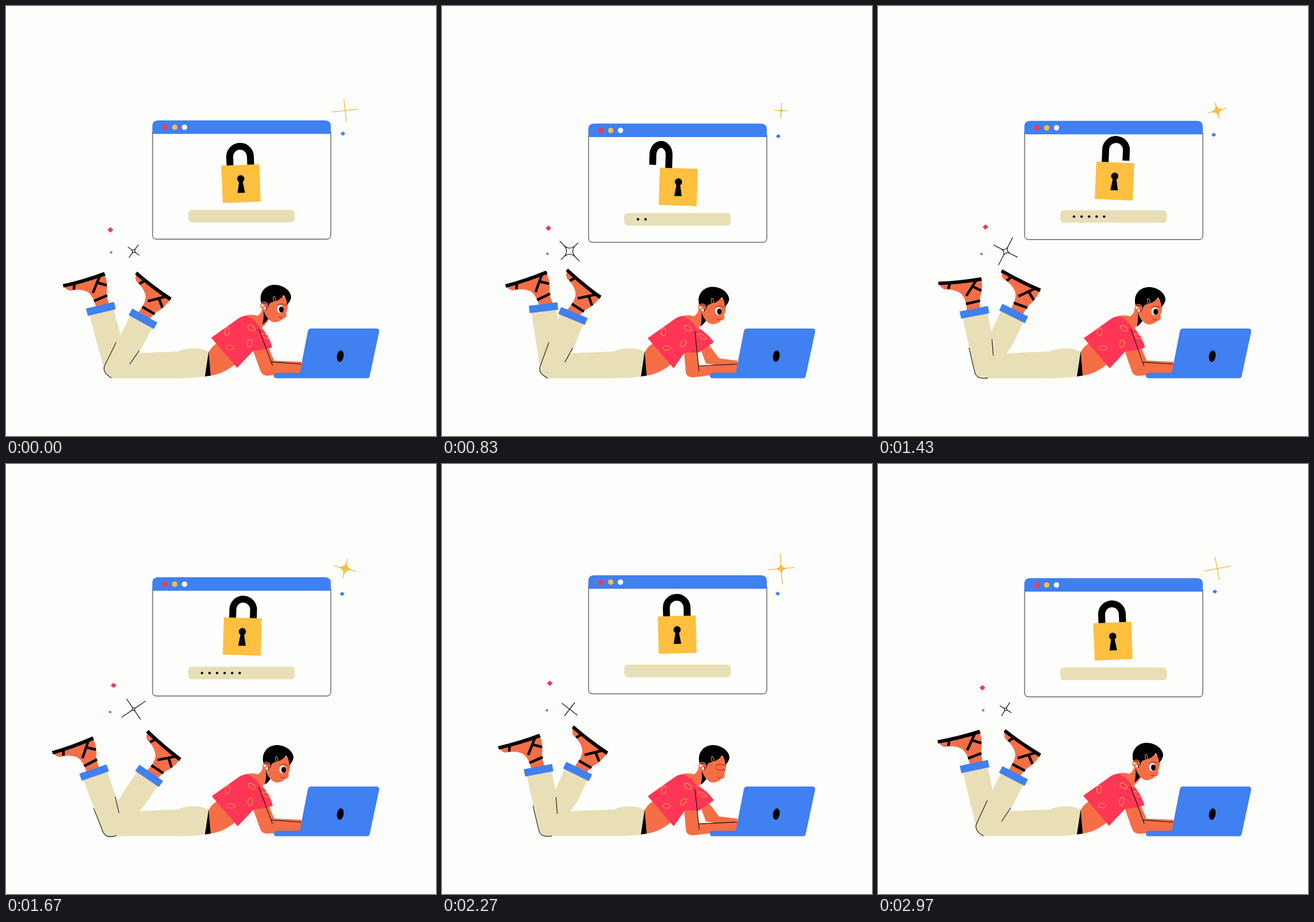
These frames come from a looping animation (748 by 748 pixels, 3.01 s). An HTML page:

```html
<!DOCTYPE html>
<html lang="en">
<head>
<meta charset="utf-8">
<title>Password lock</title>
<style>
  html, body { margin: 0; width: 100%; height: 100%; overflow: hidden; background: #fdfdfc; }
  svg { display: block; width: 100vw; height: 100vh; }
  .blue { fill: #4080f0; }
  .cream { fill: #e9dfb6; }
  .skin { fill: #f66e46; }
  .red { fill: #ff3656; }
  .yellow { fill: #ffbf3f; }
  .line { fill: none; stroke: #111; stroke-width: 1.1; stroke-linecap: round; stroke-linejoin: round; }
  .thin { fill: none; stroke: #8a1a24; stroke-width: 0.9; stroke-linecap: round; }
  .strap { fill: none; stroke: #000; stroke-width: 4.5; }
  .leaf { fill: none; stroke: #ffb04e; stroke-width: 1; }
</style>
</head>
<body>
<svg viewBox="0 0 748 748">
  <defs>
    <g id="foot">
      <path class="skin" d="M-50-46H23Q24-30 18-18Q14-8 16 8H-8Q-6-16-14-26Q-24-36-42-37Q-48-39-50-46Z"/>
      <path class="strap" d="M-8-8 17-11M14-47-6-22M5-38 21-28M-32-47-36-37"/>
      <path d="M-52-51.500Q-15-49 23-51.500L24-45Q-15-43-52-45.500Z"/>
    </g>
    <g id="shin">
      <path class="cream" d="M-22-102-19-2Q-18 11 1 11.500L8 5 18-25 22.500-58 22-102Z"/>
      <rect class="blue" x="-25" y="-111.500" width="50" height="13"/>
    </g>
  </defs>

  <g id="window">
    <path fill="#fefefd" stroke="#222" d="M255 20V199.500Q255 206.500 262 206.500H558Q565 206.500 565 199.500V20Z"/>
    <path class="blue" d="M254.500 23.500V10Q254.500 0 264.500 0H555Q565 0 565 10V23.500Z"/>
    <circle class="red" cx="276.500" cy="12" r="4.700"/>
    <circle class="yellow" cx="293.500" cy="12" r="4.700"/>
    <circle fill="#fff" cx="310.500" cy="12" r="4.700"/>
    <rect class="cream" x="317" y="155.500" width="185.500" height="22" rx="6.500"/>
    <g id="dots"></g>
  </g>

  <g id="lock">
    <path id="shackle" fill="none" stroke="#000" stroke-width="12"/>
    <rect class="yellow" x="-33" y="-65" width="66" height="65"/>
    <path d="M-3-37H3L6.500-16.500H-6.500Z"/>
    <circle cy="-41" r="6.300"/>
  </g>

  <path id="gold" class="yellow" stroke="#f5b53c" stroke-width="1.300"/>
  <path id="ink" fill="#fefefd" stroke="#222" stroke-width="1.300"/>
  <path id="gemRight" class="blue" d="M-4.200 0 0-3.700 4.200 0 0 3.700Z"/>
  <path id="gemRed" class="red" d="M-5 0 0-4.700 5 0 0 4.700Z"/>
  <path id="gemSmall" class="blue" d="M-2.700 0 0-2.600 2.700 0 0 2.600Z"/>

  <g id="backLeg"><use id="backFoot" href="#foot"/><use href="#shin"/></g>
  <path class="cream" d="M182 647.500Q173 642 180 625L197 605 300 601Q307 596 324 595.500Q344 595 353 602L346 644.500Q325 647.500 300 647.500Z"/>
  <g id="frontLeg">
    <use id="frontFoot" href="#foot"/><use href="#shin"/>
    <path class="line" d="M-21-46-19-2Q-18 11 1 11.500M21-53 18-25"/>
  </g>

  <path class="skin" d="M352 603Q358 591 370 585L402 620Q379 641 352 643.500Z"/>
  <path d="M352.500 601 356 643 346 644.500Z"/>

  <path id="backArm" class="skin"/>
  <path id="nearArm" class="skin"/>
  <g id="torso">
    <path id="shirt" class="red"/>
    <g class="leaf">
      <ellipse cx="384.500" cy="566" rx="4" ry="7" transform="rotate(10 384.500 566)"/>
      <ellipse cx="390" cy="594" rx="7" ry="4"/>
      <ellipse cx="427" cy="560" rx="4" ry="7" transform="rotate(-55 427 560)"/>
      <ellipse id="turnLeaf" rx="4" ry="7"/>
      <path d="M444 570Q452 568 460 578Q450 581 444 570"/>
    </g>
    <path class="skin" d="M417 538.500Q430 536 437 539Q444 536 446 525L462 540 450 555Q445 558 444 565Q436 545 417 538.500Z"/>
  </g>
  <g id="head">
    <path class="skin" d="M448 514Q449 536 458 546Q465 552 473 549Q480 547 481 544Q488 543 488 538L487 535Q493 520 489 508L465 497Z"/>
    <path d="M448 529Q449 545 446 554Q452 550 456 544Q450 537 448 529Z"/>
    <path d="M444 517C439 499 451 485 467 485C484 485 497 497 496 508Q494 515 488.500 520Q489 509 483 503Q476 513 463 515Q457 516 456 525L450 517Z"/>
    <circle class="skin" cx="449" cy="521" r="6.800"/>
    <path class="line" d="M446 517Q451 515 453 519M453 523V528"/>
    <circle cx="446" cy="521" r="2" fill="#fff"/>
    <circle cx="450" cy="525.500" r="2" fill="#fff"/>
    <ellipse class="leaf" cx="467" cy="510" rx="1.900" ry="5" transform="rotate(-12 467 510)"/>
    <g id="eye">
      <ellipse cx="477" cy="527" rx="5.500" ry="7" fill="#fff"/>
      <ellipse cx="479" cy="528" rx="4" ry="5.200"/>
    </g>
    <path id="lid" class="thin" d="M473 526Q478 531 486 527M485 528 488 530"/>
    <path class="thin" d="M472 521Q480 515 487 521M474 540Q477 544 481 541"/>
  </g>
  <path id="armLine" class="line"/>

  <path class="blue" d="M471 638H511L525 566Q526 561 531 561H644Q650 561 649 567L633 642Q632 647.500 629 647.500H471Q466 647.500 466 643Q466 638 471 638Z"/>
  <ellipse cx="581.500" cy="609" rx="5.800" ry="10" transform="rotate(10 581.500 609)"/>
</svg>
<script>
const LOOP = 3010;
const { sin, cos, PI, abs, max, min, floor } = Math;
const $ = id => document.getElementById(id);
const set = (id, name, value) => $(id).setAttribute(name, value);
const place = (id, x, y, turn = 0) => set(id, "transform", `translate(${x} ${y}) rotate(${turn})`);
const mix = (a, b, k) => a + (b - a) * k;
const clamp = v => max(0, min(1, v));
const smooth = (a, b, t) => { const k = clamp((t - a) / (b - a)); return k * k * (3 - 2 * k); };

const DOT_COUNT = 8;
for (let i = 0; i < DOT_COUNT; i++) {
  const dot = document.createElementNS("http://www.w3.org/2000/svg", "circle");
  dot.setAttribute("cx", 341 + 13.1 * i);
  dot.setAttribute("cy", 166.5);
  dot.setAttribute("r", 2.2);
  $("dots").append(dot);
}

// Smooth closed curve through sparse values
const TIMES = [0, 430, 830, 1430, 1930, 2270];
function drift(values, t) {
  const n = TIMES.length;
  const i = TIMES.findLastIndex(start => start <= t);
  const k = (t - TIMES[i]) / ((TIMES[i + 1] || LOOP) - TIMES[i]);
  const [a, b, c, d] = [-1, 0, 1, 2].map(j => values[(i + j + n) % n]);
  return b + k * ((c - a) / 2 + k * (a - 2.5 * b + 2 * c - d / 2 + k * (1.5 * (b - c) + (d - a) / 2)));
}

// Cross of two arms with a concave four-point body
function star(id, x, y, long, short, body, turn) {
  const s = max(0, body), q = 0.06 * s;
  set(id, "d", `M${long} 0H${s}Q${q} ${q} 0 ${s}V${short}V${s}Q${-q} ${q} ${-s} 0H${-long}H${-s}` +
    `Q${-q} ${-q} 0 ${-s}V${-short}V${-s}Q${q} ${-q} ${s} 0Z`);
  place(id, x, y, turn);
}

function drawLock(t, a) {
  place("lock", 410, 338.5 + 9.7 * sin(a + 0.31), -2.7 * cos(a + 0.55));
  const lift = 8 * (smooth(120, 480, t) - smooth(1390, 1650, t));
  const flip = 1 - 1.78 * (smooth(300, 790, t) - smooth(970, 1400, t));
  const base = -79.5 - lift, right = -17.7 + 36 * flip;
  set("shackle", "d", `M-17.7-50V${base}A${max(0.1, abs(18 * flip))} 18 0 0 ${flip > 0 ? 1 : 0} ${right} ${base}V${base + 18}`);
}

function drawLegs(a) {
  const swing = 28.5 * sin(a + 0.85), flex = 12 * cos(a - 1.35);
  place("frontLeg", 187.5, 636, 7.5 + swing);
  place("frontFoot", -4.5, -113.5, 5.5 + flex);
  place("backLeg", 189.5, 629, 8 - swing);
  place("backFoot", 0, -113.5, -0.5 - flex);
}

function drawBody(t, a) {
  const e = 0.5 - 0.5 * cos(2 * a - 0.3);
  const nod = smooth(300, 1000, t) - smooth(2350, 2930, t);
  const p = (x0, y0, x1, y1) => `${mix(x0, x1, e)} ${mix(y0, y1, e)} `;
  const hem = p(430, 600, 421, 602), cuff = p(453, 597, 446, 602), tip = p(463, 594, 472, 584);
  const bend = p(462, 619, 447, 626);
  set("backArm", "d", `M442 575L${p(455, 590, 463, 588)}L${p(466, 617, 482, 613)}L514 ${mix(619, 617, e)}V630L${p(464, 625, 459, 622)}Z`);
  set("nearArm", "d", `M440 565L${hem}L${p(442, 632, 424, 637)}Q${p(445, 643, 425, 646)}${p(454, 643, 437, 646)}L470 642 514 638V623L${bend}Z`);
  set("shirt", "d", `M357 577L405 543Q418 535 432 541L443 558Q${p(457, 573, 461, 568)}${tip}L${cuff}L${hem}L402 629.500Z`);
  set("armLine", "d", `M440 ${mix(562, 566, e)}L${p(464, 625, 447, 635)}M${bend}L513 623`);
  place("turnLeaf", mix(424, 419, e), 586.5, mix(10, 42, e));
  place("torso", nod, nod * 0.8);
  place("head", nod * 4, nod * 4);

  const blink = max(0.4 * (smooth(340, 410, t) - smooth(450, 540, t)),
    smooth(2140, 2230, t) - smooth(2310, 2400, t));
  const shut = blink > 0.9;
  set("eye", "visibility", shut ? "hidden" : "visible");
  set("eye", "transform", `translate(0 ${528 * blink}) scale(1 ${1 - blink})`);
  set("lid", "visibility", shut ? "visible" : "hidden");
}

function draw(t) {
  const a = 2 * PI * t / LOOP, turn = 360 * t / LOOP;
  place("window", 0, 199 + 5.6 * sin(a));
  const typed = t < 2120 ? floor((t - 320) / 220) : 0;
  [...$("dots").children].forEach((dot, i) => dot.setAttribute("visibility", i < typed ? "visible" : "hidden"));
  drawLock(t, a);

  const gold = 20.5 - 7 * cos(a - 1.98), ink = 20.5 - 7 * cos(a + 0.45);
  star("gold", 590, 182, gold, gold * 0.86, 6 - 5.5 * cos(a - 0.6), turn - 6);
  star("ink", 222, 426.5, ink, ink * 0.86, 6.2 + 7.5 * sin(a - 0.15), turn - 54);
  place("gemRight", drift([586, 585, 585, 584, 585.5, 584], t), drift([222, 225, 226.5, 224, 228, 225.5], t), 8 * sin(2 * a));
  place("gemRed", drift([181.5, 189, 185, 187, 187, 187.5], t), drift([389.5, 388, 386.5, 384.5, 385.5, 381.5], t), 8 * sin(a));
  place("gemSmall", drift([183, 180, 183.5, 180, 183, 182.5], t), drift([428.5, 432.5, 431, 431.5, 431, 428.5], t));

  drawLegs(a);
  drawBody(t, a);
}

const start = performance.now();
function tick() {
  draw((performance.now() - start) % LOOP);
  requestAnimationFrame(tick);
}
tick();
</script>
</body>
</html>
```
